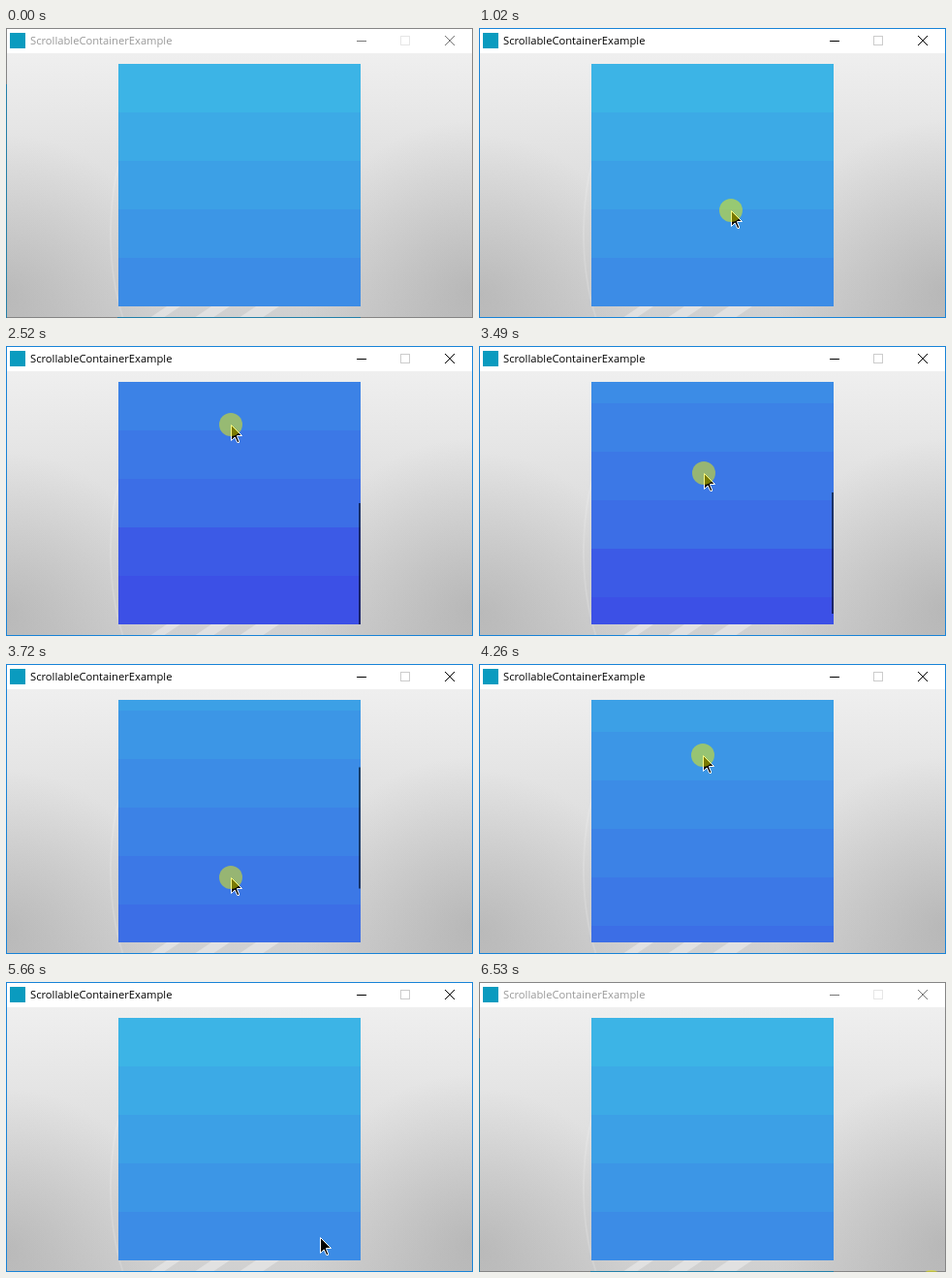
These frames come from a looping animation (482x299 px, 6680 ms). An HTML page with a canvas:

```html
<!DOCTYPE html>
<html lang="en">
<head>
<meta charset="utf-8">
<title>ScrollableContainerExample</title>
<style>
html, body { margin: 0; width: 100%; height: 100%; overflow: hidden; background: #fff; }
canvas { display: block; width: 482px; height: 299px; }
</style>
</head>
<body>
<canvas id="stage" width="482" height="299"></canvas>
<script>
const W = 482, H = 299, LOOP = 6680;
const ctx = document.getElementById('stage').getContext('2d');

const VIEW = { x: 116, y: 37, w: 250, h: 250 };
const BANDS = 10, BAND = 50, SLOP = 7;
const RANGE = BANDS * BAND - VIEW.h;
const FOCUS = 970, BLUR = 6530;

// Each move eases the pointer from rest to rest: begin, end, x, y
const START = { x: 360, y: 301 };
const MOVES = [
  [80, 640, 261, 191],
  [970, 1520, 240, 61],
  [1620, 1930, 247, 218],
  [1980, 2400, 232, 81],
  [2650, 2750, 232, 70],
  [3245, 3860, 232, 242],
  [3860, 4200, 231, 94],
  [4260, 4780, 233, 225],
  [4800, 5050, 234, 234],
  [5400, 5970, 440, 300],
  [6200, 6500, 467, 309]
];

// Button down, button up
const PRESSES = [[FOCUS, 1520], [1980, 2750], [3414, 3860], [4200, 5195], [BLUR, LOOP]];

const clamp = (v, lo, hi) => Math.min(hi, Math.max(lo, v));
const ease = u => u * u * (3 - 2 * u);

function pointerAt(t) {
  let { x, y } = START;
  for (const [begin, end, toX, toY] of MOVES) {
    const k = ease(clamp((t - begin) / (end - begin), 0, 1));
    x += (toX - x) * k;
    y += (toY - y) * k;
  }
  return { x, y };
}

// Content follows each drag one to one once the slop is passed
function scrollAt(t) {
  let offset = 0, bar = false;
  for (const [down, up] of PRESSES) {
    if (t < down) break;
    const dy = pointerAt(Math.min(t, up)).y - pointerAt(down).y;
    const move = dy - clamp(dy, -SLOP, SLOP);
    offset = clamp(offset - move, 0, RANGE);
    bar = move !== 0 && t < up + 35;
  }
  return { offset: Math.round(offset), bar };
}

function rect(color, x, y, w, h) {
  ctx.fillStyle = color;
  ctx.fillRect(x, y, w, h);
}

function trace(...pts) {
  ctx.beginPath();
  pts.forEach(([x, y]) => ctx.lineTo(x, y));
}

function stroke(color, ...pts) {
  trace(...pts);
  ctx.strokeStyle = color;
  ctx.lineWidth = 1;
  ctx.stroke();
}

function shade(x, y, r, alpha) {
  const g = ctx.createRadialGradient(x, y, 0, x, y, r);
  g.addColorStop(0, `rgba(120,120,120,${alpha})`);
  g.addColorStop(1, 'rgba(120,120,120,0)');
  rect(g, 0, 26, W, H - 26);
}

function backdrop() {
  const g = ctx.createLinearGradient(0, 26, 0, H);
  g.addColorStop(0, '#efefef');
  g.addColorStop(0.35, '#e3e3e3');
  g.addColorStop(1, '#d0d0d0');
  rect(g, 0, 26, W, H - 26);
  shade(0, 275, 165, 0.28);
  shade(W, 270, 175, 0.3);

  ctx.strokeStyle = 'rgba(255,255,255,.15)';
  ctx.lineWidth = 2;
  ctx.beginPath();
  ctx.ellipse(198, 212, 90, 170, 0, Math.PI * 0.82, Math.PI * 1.2);
  ctx.stroke();

  ctx.fillStyle = 'rgba(255,255,255,.35)';
  for (let i = 0; i < 3; i++) {
    const x = 148 + i * 46, w = 14 + i * 5;
    trace([x, H], [x + 18, 287], [x + 18 + w, 287], [x + w, H]);
    ctx.fill();
  }
}

function titleBar(active) {
  const ink = active ? '#000' : '#777';
  rect('#fff', 0, 0, W, 26);
  rect('#0a9bbf', 4, 5, 16, 16);
  ctx.fillStyle = active ? '#000' : '#999';
  ctx.font = '11.2px "Open Sans", "Noto Sans", sans-serif';
  ctx.fillText('ScrollableContainerExample', 25, 17);

  stroke(ink, [362, 13.5], [372, 13.5]);
  ctx.strokeStyle = active ? '#ccc' : '#e6e6e6';
  ctx.strokeRect(407.5, 8.5, 9, 9);
  stroke(ink, [453, 8], [463, 18]);
  stroke(ink, [463, 8], [453, 18]);
}

function border(active) {
  ctx.strokeStyle = active ? '#1883d7' : '#858585';
  ctx.lineWidth = 1;
  ctx.strokeRect(0.5, 0.5, W - 1, H - 1);
  if (!active) {
    rect('#237fa8', 0, 58, 1, H - 58);
    rect('#237fa8', 115, H - 1, 251, 1);
  }
}

function list({ offset, bar }) {
  ctx.save();
  ctx.beginPath();
  ctx.rect(VIEW.x, VIEW.y, VIEW.w, VIEW.h);
  ctx.clip();
  for (let i = 0; i < BANDS; i++) {
    const green = 180 - 10 * (i < 8 ? i : i + 1);
    rect(`rgb(60,${green},230)`, VIEW.x, VIEW.y + i * BAND - offset, VIEW.w, BAND);
  }
  if (bar) rect('rgba(0,0,0,.55)', VIEW.x + VIEW.w - 2, VIEW.y + offset / 2, 2, VIEW.h / 2);
  ctx.restore();
}

function pointer({ x, y }, pressed) {
  ctx.save();
  ctx.translate(Math.round(x), Math.round(y));
  trace([0.5, 0.5], [0.5, 16.5], [4.2, 13], [6.8, 18.5], [8.5, 18.5],
    [8.5, 17], [6.6, 12.5], [6.6, 11.5], [11.5, 11.5]);
  ctx.closePath();
  ctx.fillStyle = '#000';
  ctx.fill();
  ctx.strokeStyle = '#fff';
  ctx.lineWidth = 1;
  ctx.stroke();
  if (pressed) {
    ctx.fillStyle = 'rgba(242,242,0,.5)';
    ctx.beginPath();
    ctx.arc(0, 0, 12, 0, Math.PI * 2);
    ctx.fill();
  }
  ctx.restore();
}

function draw(t) {
  const active = t >= FOCUS && t < BLUR;
  const pressed = PRESSES.some(([down, up]) => t >= down && t < up);
  backdrop();
  titleBar(active);
  border(active);
  list(scrollAt(t));
  pointer(pointerAt(t), pressed);
}

const begin = performance.now();
function tick() {
  draw((performance.now() - begin) % LOOP);
  requestAnimationFrame(tick);
}
tick();
</script>
</body>
</html>
```
